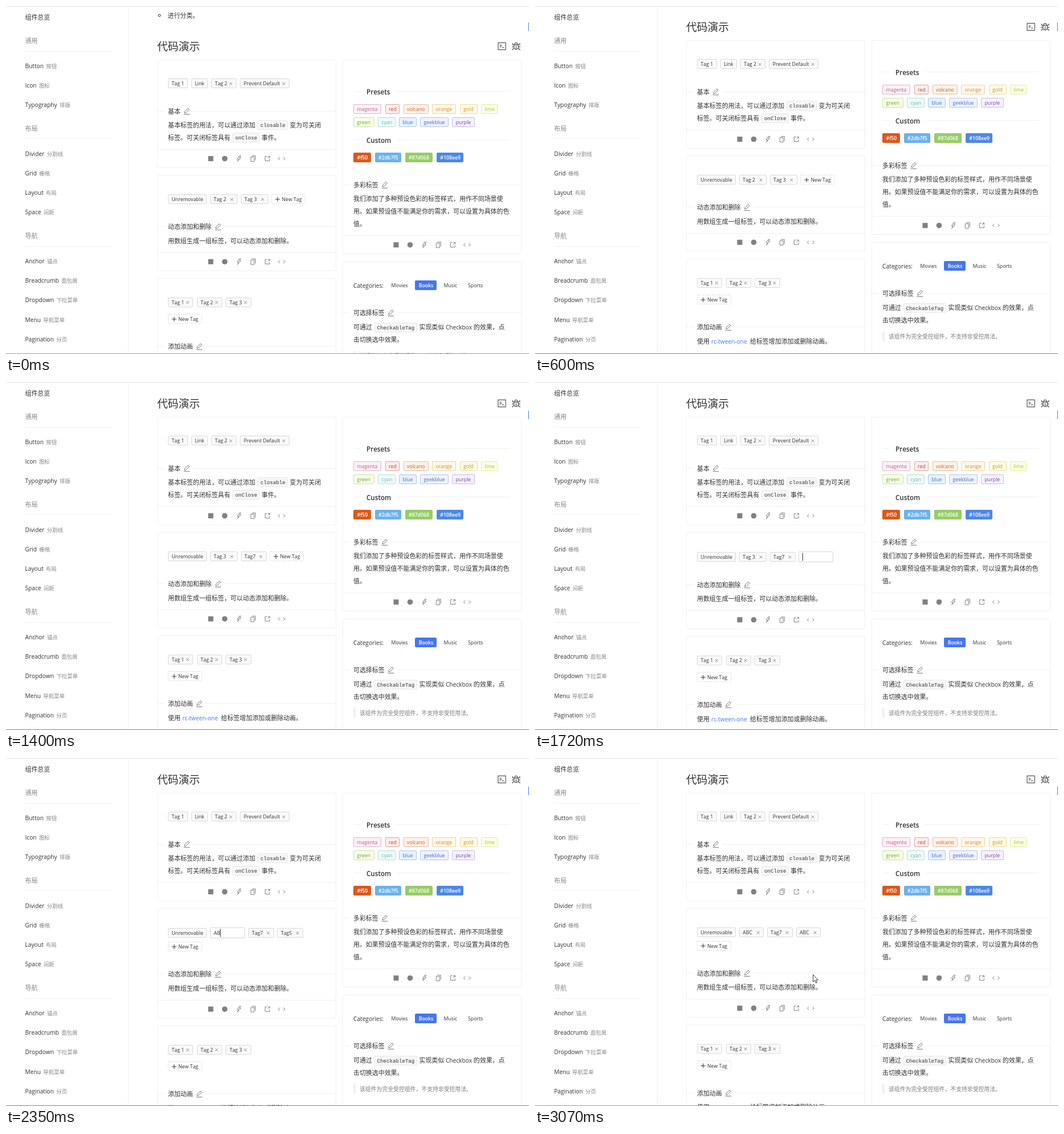
These frames come from a looping animation (917 px wide and 610 px high, 3670 ms). An HTML page:

```html
<!DOCTYPE html>
<html lang="zh-CN">
<head>
<meta charset="utf-8">
<title>代码演示</title>
<style>
html, body { margin: 0; width: 100%; height: 100%; overflow: hidden; background: #fff; }
svg { display: block; width: 100%; height: 100%; }
text { font-family: "Open Sans", "Noto Sans CJK SC", "Noto Sans CJK", sans-serif; font-kerning: none; white-space: pre; }
.code { font-family: "Liberation Mono", monospace; }
.icon { fill: none; }
</style>
</head>
<body>
<svg id="stage" viewBox="0 0 917 610"></svg>
<script>
const LOOP = 3670;
const BODY = 10.95, SMALL = 9.4, LATIN = 0.93;
const INK = '#303030', GREY = '#858585', BLUE = '#4676f0', RULE = '#f0f0f0';

const ICONS = {
  edit: 'M-5.2 5.3H5.4M-4 2.8l.5-2.5L2.4-5.3 4.6-3.1-1.3 2.5z',
  bolt: 'M.8-5-3 .8h2.6L-2.6 5 3.4-1.6H.6L3.6-5z',
  copy: 'M-2-5H4V3M-4-3H1.8V5H-4z',
  open: 'M-.5-4H-4V4H4V.5M.5-.5 4-4M1.2-4.2h3v3',
  code: 'M-3-2.6-6 0-3 2.6M3-2.6 6 0 3 2.6',
  term: 'M-6.6-6.2H6.6V6.2H-6.6zM-3.6-3-.9-.6-3.6 1.8M.2 2.4h3.4',
  bug: 'M-3.8-2.5h7.6v4a3.8 4 0 0 1-7.6 0zM-2.6-2.5a2.6 3.6 0 0 1 5.2 0M0-.5V5.5M-7.2 1h3.4M3.8 1h3.4' +
    'M-6.3-5.5v2.2l2.5 1M6.3-5.5v2.2l-2.5 1M-6.3 7V5.2l3-1.4M6.3 7V5.2l-3-1.4',
  close: 'M-2.4-2.4 2.4 2.4M2.4-2.4-2.4 2.4',
  plus: 'M-4 0H4M0-4V4'
};

const icon = (name, x, y, color = '#808080', width = 1) =>
  `<path class="icon" d="${ICONS[name]}" stroke="${color}" stroke-width="${width}" transform="translate(${x} ${y})"/>`;
const rect = (x, y, w, h, fill, stroke = 'none', extra = '') =>
  `<rect x="${x}" y="${y}" width="${w}" height="${h}" fill="${fill}" stroke="${stroke}" ${extra}/>`;
const hline = (x1, x2, y) => rect(x1, Math.floor(y), x2 - x1, 1, RULE);

// A bordered box, 17 px high around y, with its border on whole pixels.
function box(x, y, w, fill, line, extra = '') {
  const left = Math.floor(x), right = Math.round(x + w);
  return rect(left + 0.5, Math.round(y - 8.6) + 0.5, right - left - 1, 16, fill, line, 'rx="1.6" ' + extra);
}

// Latin runs are set a little smaller than the CJK around them.
const runs = (s, size) => s.replace(/[\x20-\x7e]+/g, m => `<tspan font-size="${size * LATIN}">${m}</tspan>`);
const text = (x, y, s, size = BODY, fill = INK, extra = '') =>
  `<text x="${x}" y="${y + size * 0.365}" font-size="${size}" fill="${fill}" ${extra}>${runs(s, size)}</text>`;

const chip = (x, y, w, s) =>
  box(x, y, w, '#f7f7f7', '#e8e8e8') +
  `<text class="code" x="${x + 4.6}" y="${y + 3.2}" font-size="9.15" fill="${INK}">${s}</text>`;

function tag(x, y, w, s, o = {}) {
  const { fill = '#fafafa', line = '#d9d9d9', ink = INK, close, hot, bold } = o;
  return box(x, y, w, fill, line) +
    text(x + 6, y, s, SMALL, ink, bold ? 'font-weight="600"' : '') +
    (close ? icon('close', x + w - 9.8, y + 0.3, hot ? '#222' : '#8a8a8a') : '');
}
const newTag = (x, y) =>
  box(x, y, 59, '#fff', '#d9d9d9', 'stroke-dasharray="2.4 1.6"') +
  icon('plus', x + 10.3, y, INK) + text(x + 17.5, y, 'New Tag', SMALL);

const card = (x, y, h, id = '') => rect(x + 0.5, y, 313, h, 'none', RULE, `rx="2" ${id && `id="${id}"`}`);

function title(x, y, s) {
  const mid = x + s.length * BODY + 11;
  return hline(x - 19, x - 6, y - 1) + hline(mid + 11, x + 294, y - 1) +
    text(x, y, s) + icon('edit', mid, y - 0.5, '#707070');
}
function actions(x, y) {
  return hline(x, x + 313, y - 16) +
    rect(x + 89.5, y - 4.5, 9, 9, '#808080') +
    `<circle cx="${x + 118.5}" cy="${y}" r="4.8" fill="#808080"/>` +
    ['bolt', 'copy', 'open', 'code'].map((n, i) => icon(n, x + 143.3 + i * 25, y)).join('');
}

function sidebar() {
  const groups = [
    [61.5, '通用', 'Button 按钮,Icon 图标,Typography 排版'],
    [215, '布局', 'Divider 分割线,Grid 栅格,Layout 布局,Space 间距'],
    [403.5, '导航', 'Anchor 锚点,Breadcrumb 面包屑,Dropdown 下拉菜单,Menu 导航菜单,Pagination 分页']
  ];
  let out = rect(214, 1, 1, 608, RULE) + text(33.5, 19.8, '组件总览');
  for (const [y, name, items] of groups) {
    out += text(33.5, y, name, BODY, GREY) + hline(33.5, 186, y + 17.5);
    items.split(',').forEach((item, i) => {
      const [en, zh] = item.split(' ');
      const iy = y + 43.5 + i * 34.2;
      out += `<text x="33.5" y="${iy + 4}" font-size="${BODY * LATIN}" fill="${INK}">${en}` +
        `<tspan dx="4.4" font-size="${SMALL}" fill="${GREY}">${zh}</tspan></text>`;
    });
  }
  return out;
}

function basicCard() {
  return card(265, 61.5, 189) +
    tag(284.5, 103, 34, 'Tag 1') + tag(325, 103, 28.5, 'Link') +
    tag(360.3, 103, 43.7, 'Tag 2', { close: 1 }) + tag(410.8, 103, 86, 'Prevent Default', { close: 1 }) +
    title(284, 152, '基本') +
    text(284, 176, '基本标签的用法，可以通过添加') + chip(441.5, 176, 52.5, 'closable') + text(497.5, 176, '变为可关闭') +
    text(284, 198, '标签。可关闭标签具有') + chip(397.5, 198, 47, 'onClose') + text(448, 198, '事件。') +
    actions(265, 234.5);
}

function lowerLeft() {
  return title(284, 354.5, '动态添加和删除') +
    text(284, 378.7, '用数组生成一组标签，可以动态添加和删除。') + actions(265, 415.2) +
    card(265, 444.5, 240) +
    [1, 2, 3].map(n => tag(284.5 + (n - 1) * 50.7, 486.3, 43.7, 'Tag ' + n, { close: 1 })).join('') +
    newTag(284.5, 516) + title(284, 564.5, '添加动画') +
    text(284, 589, '使用') + text(309, 589, 'rc-tween-one', BODY, BLUE) + text(377, 589, '给标签增加添加或删除动画。');
}

// name, x, width, row, ink, border, fill
const PRESETS = `magenta 609.5 48.5 0 #b5628c #e3b4ca #fcf1f6
red 665 25 0 #b8433f #e0a39d #fcefed
volcano 697 43.5 0 #c2602a #eabf9c #fdf2e9
orange 747.5 41.5 0 #cc8738 #f0d294 #fef8e9
gold 796 30.5 0 #c5962c #eedd94 #fefae4
lime 833.5 28.5 0 #a6c23a #e3ee8e #fcfee8
green 609.5 36 1 #6ba52f #cfe394 #f8fdea
cyan 652.5 30.5 1 #6fb0b0 #aee0da #effcfa
blue 689.5 30 1 #3b74d8 #a6c8f4 #e8f2fd
geekblue 726.5 49 1 #4a68cf #b2c4f5 #eff3fe
purple 782.5 39 1 #6f4aa8 #cdb6ea #f7f1fd`;
const CUSTOM = [['#f50', 609.5, 30.5, '#dc581b'], ['#2db7f5', 647, 46, '#6cb1ee'],
  ['#87d068', 700, 48, '#97cc68'], ['#108ee9', 755.3, 46.5, '#4d88e4']];

function colourCard() {
  const heading = (y, s, end) => hline(609.5, 621, y - 1) + hline(end, 884, y - 1) +
    text(632, y, s, 12.5, INK, 'font-weight="600"');
  const presets = PRESETS.split('\n').map(row => {
    const [name, x, w, r, ink, line, fill] = row.split(' ');
    return tag(+x, 147.5 + r * 23.2, +w, name, { ink, line, fill });
  }).join('');
  const custom = CUSTOM.map(([s, x, w, c]) => tag(x, 232.3, w, s, { fill: c, line: c, ink: '#fff', bold: 1 })).join('');
  return card(590, 61.5, 340) + heading(117.5, 'Presets', 683) + presets + heading(202.5, 'Custom', 686) + custom +
    title(609, 281.3, '多彩标签') +
    text(609, 305.5, '我们添加了多种预设色彩的标签样式，用作不同场景使') +
    text(609, 327.5, '用。如果预设值不能满足你的需求，可以设置为具体的色') +
    text(609, 349.3, '值。') + actions(590, 385.7);
}

function checkCard() {
  return card(590, 415.5, 270) + text(609, 457, 'Categories:') +
    text(675.5, 457, 'Movies', SMALL) +
    tag(717.7, 457, 37, 'Books', { fill: BLUE, line: BLUE, ink: '#fff', bold: 1 }) +
    text(767.5, 457, 'Music', SMALL) + text(810, 457, 'Sports', SMALL) +
    title(609, 505.5, '可选择标签') +
    text(609, 530, '可通过') + chip(646, 530.5, 74.5, 'CheckableTag') + text(724.5, 530, '实现类似 Checkbox 的效果，点') +
    text(609, 551.8, '击切换选中效果。') +
    rect(609.5, 572, 3, 16, '#ececec') + text(620, 580, '该组件为完全受控组件，不支持非受控用法。', 9.85, '#7a7a7a');
}

const stage = document.getElementById('stage');
stage.innerHTML = sidebar() +
  `<g id="page">
    <circle cx="269" cy="-16.5" r="2" fill="none" stroke="${INK}"/>` +
    text(283.5, -16.3, '进行分类。') + text(265, 38, '代码演示', 18.8) +
    icon('term', 869.5, 37.5, '#555', 1.2) + icon('bug', 894.5, 37.5, '#555', 1.3) +
    basicCard() + colourCard() + checkCard() + card(265, 263.5, 167.5, 'dynCard') +
    `<g id="row"></g><g id="lower">${lowerLeft()}</g>
  </g>` +
  rect(916, 29, 1, 15, BLUE, 'none', 'id="mark"') +
  rect(0, 0, 917, 1, '#e2e2e2') + rect(0, 609, 917, 1, '#8c8c8c', 'none', 'id="edge"') +
  `<path id="pointer" d="M487.6 379.8v12.6l2.9-2.6 2 4.6 2-.9-2-4.4h3.8z" fill="#fff" stroke="#222" stroke-width=".9"/>`;
const [page, row, lower, dynCard, mark, edge, pointer] =
  ['page', 'row', 'lower', 'dynCard', 'mark', 'edge', 'pointer'].map(id => document.getElementById(id));

const WIDTHS = { Unremovable: 67.5, 'Tag 2': 47.5, 'Tag 3': 47.5, Tag7: 44.5, Tag5: 45, ABC: 42.7 };

// Each step changes part of the state; a tag starting with "|" is an input.
const STEPS = [
  [0, { scroll: 33, mark: 29, tags: 'Tag 2,Tag 3', edge: '#999' }],
  [110, { edge: '#808080' }],
  [600, { scroll: -1 }],
  [700, { scroll: 0, mark: 50, hot: 1 }],
  [800, { tags: 'Tag 3' }],
  [900, { hot: 0 }],
  [1000, { tags: 'Tag 3,|', adding: true }],
  [1100, { tags: 'Tag 3,|Tag' }],
  [1300, { tags: 'Tag 3,|Tag7' }],
  [1400, { tags: 'Tag 3,Tag7', adding: false }],
  [1720, { tags: 'Tag 3,Tag7,|', adding: true }],
  [1820, { tags: 'Tag 3,Tag7,|Tag' }],
  [1920, { tags: 'Tag 3,Tag7,|Tag5' }],
  [2020, { tags: 'Tag 3,Tag7,Tag5', adding: false, hot: 3 }],
  [2120, { tags: '|Tag 3,Tag7,Tag5', hot: 0 }],
  [2220, { tags: '|,Tag7,Tag5' }],
  [2350, { tags: '|AB,Tag7,Tag5' }],
  [2450, { tags: '|ABC,Tag7,Tag5' }],
  [2570, { tags: 'ABC,Tag7,Tag5', hot: 1 }],
  [2670, { tags: 'ABC,Tag7,|Tag5', hot: 0 }],
  [2770, { tags: 'ABC,Tag7,|' }],
  [2870, { tags: 'ABC,Tag7,|ABC' }],
  [2970, { tags: 'ABC,Tag7,ABC' }],
  [3070, { pointer: true, edge: '#999' }]
];
let last = {};
const states = STEPS.map(([at, change]) => (last = { ...last, ...change, at }));

function drawRow({ tags, adding, hot }) {
  const editing = tags.includes('|');
  const y = 305.8 + (editing ? 0.8 : 0);
  let x = 284.5, out = '', wrapped = false;
  ['Unremovable', ...tags.split(',')].forEach((s, i) => {
    const input = s[0] === '|';
    const w = input ? 60.5 : WIDTHS[s];
    out += input
      ? rect(Math.floor(x) + 0.5, 297.5, 60, 18, '#fff', '#d4d4d4', 'rx="1.6"') +
        text(x + 6, y, s.slice(1), SMALL, INK, 'id="typed"') + rect(x + 5.9, y - 7, 1, 14, '#222', 'none', 'id="caret"')
      : tag(x, y, w, s, { close: i > 0, hot: i > 0 && i === hot });
    x += w + 6.3;
  });
  if (!adding) {
    wrapped = x + 59 > 560;
    out += wrapped ? newTag(284.5, 329.3 + (editing ? 1.6 : 0)) : newTag(x, y);
  }
  row.innerHTML = out;
  if (editing) {
    const typed = document.getElementById('typed'), caret = document.getElementById('caret');
    caret.setAttribute('x', +caret.getAttribute('x') + typed.getComputedTextLength());
  }
  return (wrapped ? 23.4 : 0) + (editing ? 1.6 : 0);
}

function show(s) {
  const grow = drawRow(s);
  page.setAttribute('transform', `translate(0 ${s.scroll})`);
  lower.setAttribute('transform', `translate(0 ${grow})`);
  dynCard.setAttribute('height', 167.5 + grow);
  mark.setAttribute('y', s.mark);
  edge.setAttribute('fill', s.edge);
  pointer.setAttribute('visibility', s.pointer ? 'visible' : 'hidden');
}

const start = performance.now();
let current = null;
function tick() {
  const t = (performance.now() - start) % LOOP;
  const next = states.findLast(s => s.at <= t);
  if (next !== current) show(current = next);
  requestAnimationFrame(tick);
}
tick();
</script>
</body>
</html>
```
